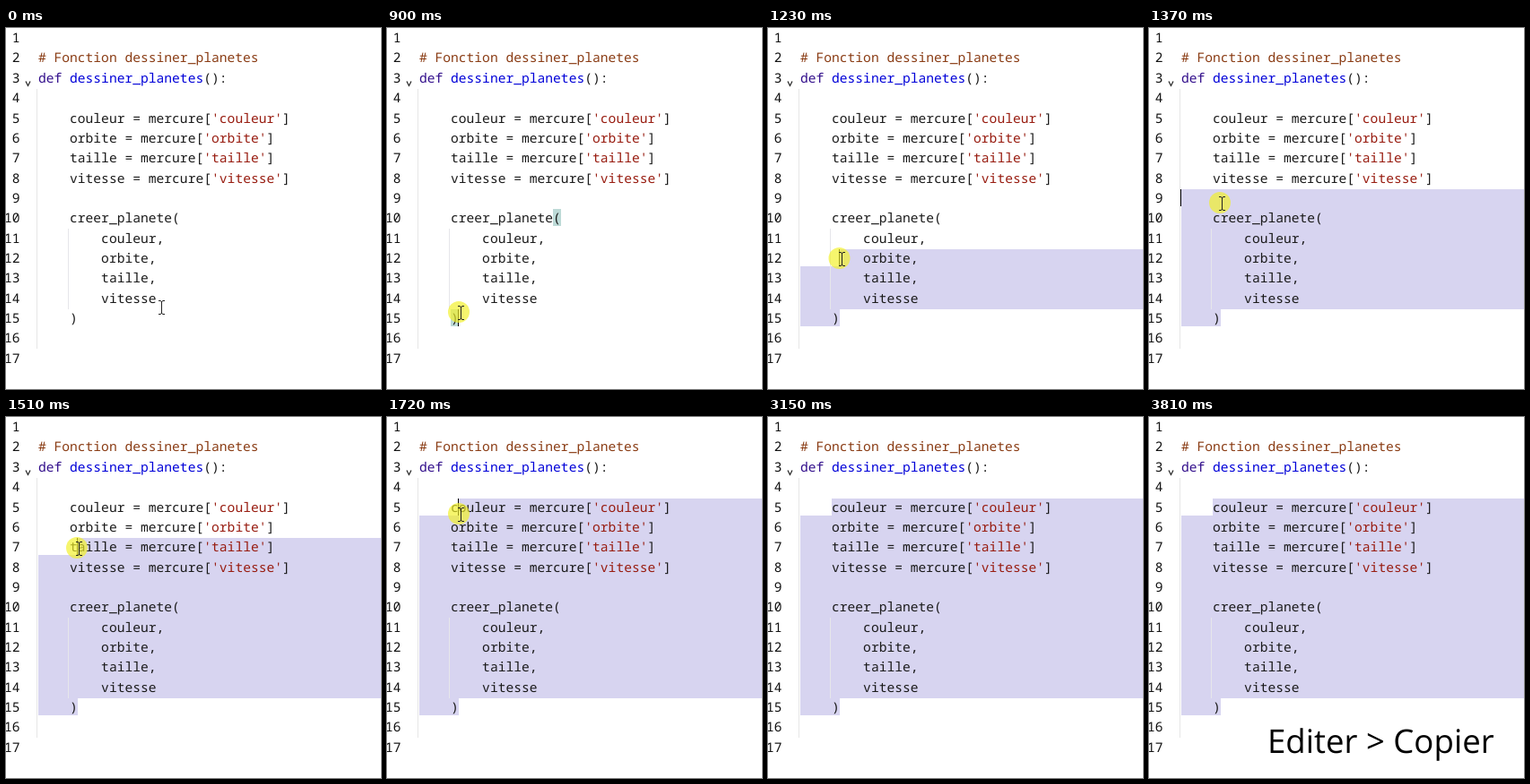
An HTML page with a canvas for the animation above (4780 ms loop, 418 by 403 pixels).

```html
<!DOCTYPE html>
<html lang="fr">
<head>
<meta charset="utf-8">
<style>
  html, body { margin: 0; overflow: hidden; background: #fff; }
  canvas { display: block; }
</style>
</head>
<body>
<canvas id="stage" width="418" height="403"></canvas>
<script>
const ctx = document.getElementById('stage').getContext('2d');
const LOOP = 4780, TICK = 68.3;
const WIDTH = 418, LEFT = 35.9, TOP = 0.7, LINE = 22.35, CHAR = 8.78;
const PRESS = 10, CLICK = 11, DRAG = 14, RELEASE = 34;

const code = `
# Fonction dessiner_planetes
def dessiner_planetes():

    couleur = mercure['couleur']
    orbite = mercure['orbite']
    taille = mercure['taille']
    vitesse = mercure['vitesse']

    creer_planete(
        couleur,
        orbite,
        taille,
        vitesse
    )

`.split('\n');

const syntax = [
  [/#.*/g, '#8a3c14'],
  [/'[^']*'/g, '#981c10'],
  [/\bdef\b/g, '#33108c'],
  [/dessiner_planetes(?=\()/g, '#0000d8']
];

// Pointer path: tick, x, y
const path = [
  [0, 173, 312], [3, 150, 350], [5, 118, 360], [7, 86, 345], [8, 83, 328],
  [10, 82, 318], [13, 82, 318], [18, 81.5, 258], [20, 81, 196], [22, 81, 147],
  [25, 82, 109], [28, 82, 109], [30, 76, 105], [37, 76, 105], [38, 105, 181],
  [40, 160, 240], [42, 260, 285], [45, 414, 303], [47, 440, 300]
];

function pointerAt(tick) {
  const i = path.findIndex(key => key[0] > tick);
  if (i < 0) return path[path.length - 1].slice(1);
  const [t0, x0, y0] = path[i - 1], [t1, x1, y1] = path[i];
  const k = (tick - t0) / (t1 - t0);
  return [x0 + (x1 - x0) * k, y0 + (y1 - y0) * k];
}

const colX = col => LEFT + col * CHAR;
const rowY = row => TOP + row * LINE;
const textTop = row => rowY(row) + 0.6;
const textBottom = row => rowY(row) + 19.5;

function box(color, left, top, right, bottom) {
  const [x, y] = [Math.round(left), Math.round(top)];
  ctx.fillStyle = color;
  ctx.fillRect(x, y, Math.round(right) - x, Math.round(bottom) - y);
}

function stroke(color, width, points) {
  ctx.strokeStyle = color;
  ctx.lineWidth = width;
  ctx.beginPath();
  points.forEach(([x, y]) => ctx.lineTo(x, y));
  ctx.stroke();
}

// Partial first line, full middle block, partial last line
function drawSelection(row, col) {
  const lilac = '#d7d4f0';
  const end = col => colX(col);
  if (row === 14) return box(lilac, colX(col), textTop(14), end(5), textBottom(14));
  box(lilac, colX(col), textTop(row), WIDTH, textBottom(row));
  box(lilac, LEFT, textBottom(row), WIDTH, textTop(14));
  box(lilac, LEFT, textTop(14), end(5), textBottom(14));
}

function drawBracketMatch(row, col) {
  box('#bddad7', colX(col), textTop(row), colX(col + 1), textBottom(row));
}

function drawCode() {
  ctx.font = '14.63px "Noto Sans Mono", "DejaVu Sans Mono", monospace';
  const put = (text, x, row, color) => {
    ctx.fillStyle = color;
    ctx.fillText(text, x, Math.round(rowY(row) + 15.4));
  };
  code.forEach((line, row) => {
    const number = String(row + 1);
    put(number, 15.5 - number.length * CHAR, row, '#111');
    let rest = line;
    for (const [pattern, color] of syntax) {
      rest = rest.replace(pattern, (token, at) => {
        put(token, colX(at), row, color);
        return ' '.repeat(token.length);
      });
    }
    put(rest, LEFT, row, '#1a1a1a');
  });
  stroke('#222', 1.2, [[22, 59.5], [24.5, 64.5], [27, 59.5]]);
}

function drawPointer(x, y, pressed) {
  if (pressed) {
    ctx.fillStyle = 'rgba(242,240,40,.68)';
    ctx.beginPath();
    ctx.arc(x - 2, y - 1, 12, 0, 7);
    ctx.fill();
  }
  x = Math.round(x) + 0.5;
  y = Math.round(y);
  stroke('#222', 1, [[x, y - 7], [x, y + 7]]);
  for (const end of [-1, 1]) {
    const tip = y + end * 7.5;
    stroke('#222', 1, [[x - 3.5, tip], [x - 1, tip], [x, y + end * 6], [x + 1, tip], [x + 3.5, tip]]);
  }
}

function draw(now) {
  const tick = Math.floor((now % LOOP + 25) / TICK);
  ctx.textRendering = 'geometricPrecision';
  box('#fff', 0, 0, WIDTH, 403);

  const [headX, headY] = pointerAt(Math.min(tick, RELEASE));
  const row = tick < DRAG ? 14 : Math.floor((headY - TOP) / LINE);
  const col = code[row] ? Math.round((headX - 2 - LEFT) / CHAR) : 0;

  if (tick >= DRAG) drawSelection(row, col);
  box('#e6e6e6', 34, rowY(3), 35, rowY(16));
  box('#e6e6ea', 69, rowY(10), 70, rowY(14));
  if (tick >= CLICK && tick < DRAG) {
    drawBracketMatch(9, 17);
    drawBracketMatch(14, 4);
  }
  drawCode();

  const caretOn = tick >= CLICK && tick < 38 || tick >= 47 && tick < 56;
  if (caretOn) box('#000', colX(col) - 0.5, textTop(row), colX(col) + 0.5, textBottom(row));
  if (tick < 47) drawPointer(...pointerAt(tick), tick >= PRESS && tick < RELEASE);

  if (tick >= 56) {
    ctx.font = '36.6px "Open Sans", "Noto Sans", sans-serif';
    ctx.fillStyle = '#000';
    ctx.fillText('Editer > Copier', 132, 375);
  }
}

function loop() {
  draw(performance.now());
  requestAnimationFrame(loop);
}
loop();
</script>
</body>
</html>
```
